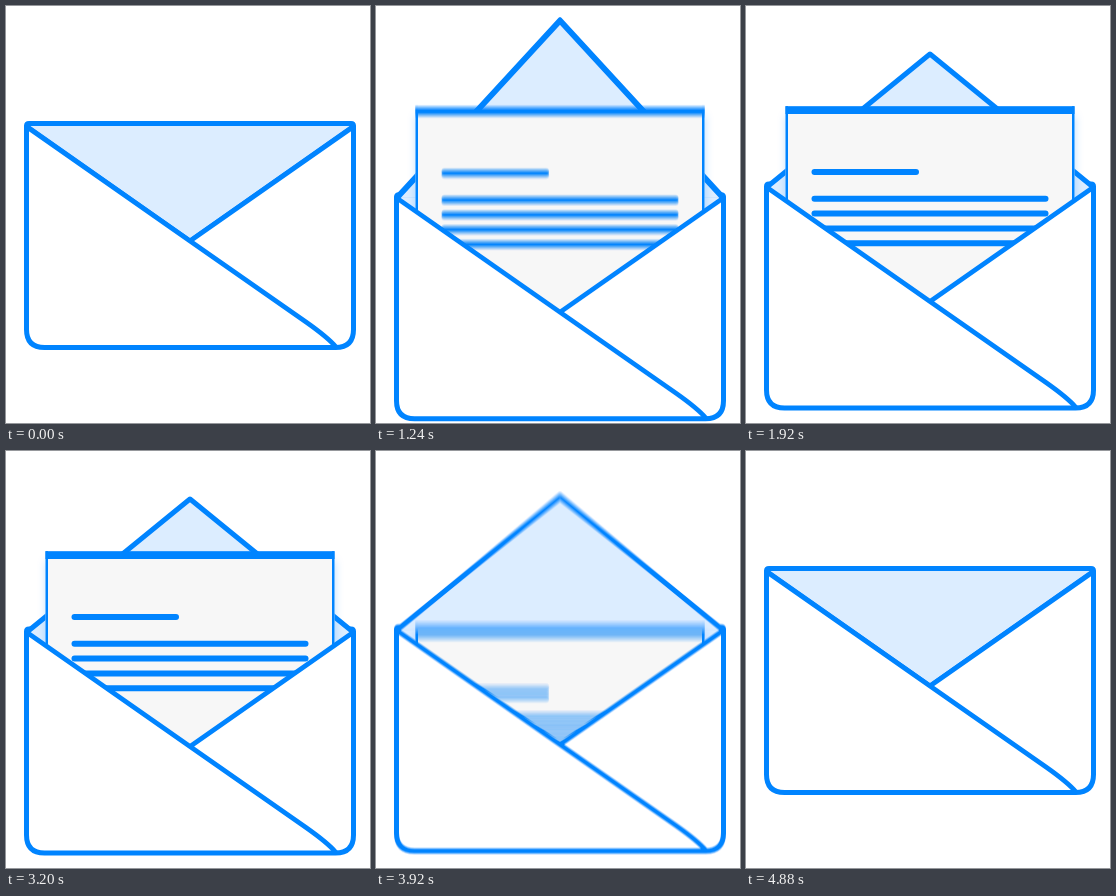
An HTML page with a canvas for the animation above (5.52 s loop, 364 by 417 pixels).

```html
<!DOCTYPE html>
<html lang="en">
<head>
<meta charset="utf-8">
<title>Envelope</title>
<style>
  html, body { margin: 0; width: 100%; height: 100%; overflow: hidden; background: #fff; }
  canvas { display: block; width: 364px; height: 417px; }
</style>
</head>
<body>
<canvas id="stage" width="364" height="417"></canvas>
<script>
const W = 364, H = 417, LOOP = 5520, STEP = 40;
const SHUTTER = 20, SAMPLES = 16;
const BLUE = '#0084ff', PALE = '#dcedff', PAPER = '#f7f7f7';
const OVER = 0.18; // share by which each move swings past both ends

const out = document.getElementById('stage').getContext('2d');
const buffer = document.createElement('canvas');
buffer.width = W;
buffer.height = H;
const g = buffer.getContext('2d');

// Key times: start, wind-up, overshoot, settled.
const envelopeKeys = { open: [40, 440, 1180, 1680], close: [3280, 3680, 4420, 4840] };
const paperKeys = { open: [300, 661, 1500, 1920], close: [3200, 3560, 4290, 4640] };

// cubic-bezier(.6, 0, .4, 1)
function ease(x) {
  if (x <= 0) return 0;
  if (x >= 1) return 1;
  let lo = 0, hi = 1;
  for (let i = 0; i < 24; i++) {
    const u = (lo + hi) / 2;
    const at = u * u * (3 - 2 * u) + 1.8 * u * (1 - u) * (1 - 2 * u);
    if (at < x) lo = u; else hi = u;
  }
  return lo * lo * (3 - 2 * lo);
}

// 0 to 1 with a swing before the start and past the end
function swing(t, keys) {
  const levels = [0, -OVER, 1 + OVER, 1];
  let v = 0;
  for (let i = 0; i < 3; i++) {
    const x = (t - keys[i]) / (keys[i + 1] - keys[i]);
    v += (levels[i + 1] - levels[i]) * ease(x);
  }
  return v;
}

const openness = (t, keys) => swing(t, keys.open) - swing(t, keys.close);

function stroke(path, width) {
  g.lineWidth = width;
  g.stroke(new Path2D(path));
}

function fill(path, color) {
  g.fillStyle = color;
  g.fill(new Path2D(path));
}

function drawBack() {
  fill('M20.5 118H347.5L184 236Z', PALE);
  stroke('M20.5 126V120Q20.5 117.5 23 117.5H345Q347.5 117.5 347.5 120V126', 5);
}

function drawFlap(open) {
  g.save();
  g.translate(0, 120.5);
  g.scale(1, (247.5 * open - 114.5) / 133);
  const edge = 'M21 0L184 -133L347 0';
  fill(edge + 'Z', PALE);
  stroke(edge, 5);
  g.restore();
}

function drawPaper(top, bottom) {
  g.save();
  g.beginPath();
  g.rect(0, 0, W, bottom);
  g.clip();
  g.translate(0, top);
  g.shadowColor = 'rgba(0,132,255,.28)';
  g.shadowBlur = 9;
  g.shadowOffsetY = 9;
  g.fillStyle = PAPER;
  g.fillRect(39.5, -3, 289, 240);
  g.shadowColor = 'transparent';
  g.fillStyle = BLUE;
  g.fillRect(39.5, -3.8, 2.5, 240);
  g.fillRect(326, -3.8, 2.5, 240);
  g.fillRect(39.5, -3.8, 289, 7.8);
  stroke('M68.5 62H170', 6);
  for (let i = 0; i < 4; i++) {
    stroke(`M68.5 ${88.8 + 14.8 * i}H299.5`, 6);
  }
  g.restore();
}

function drawFront() {
  const body = 'M20.5 121V323.5Q20.5 341.5 38.5 341.5H329.5Q347.5 341.5 347.5 323.5V121';
  fill(body + 'L184 235Z', '#fff');
  stroke(body, 5);
  stroke('M21 121L184 235L347 121M184 235L300 316Q322 331.5 330 341', 4.6);
}

function drawScene(t) {
  const dy = 60.5 * openness(t, envelopeKeys);
  g.fillStyle = '#fff';
  g.fillRect(0, 0, W, H);
  g.strokeStyle = BLUE;
  g.lineCap = g.lineJoin = 'round';
  g.save();
  g.translate(0, dy);
  drawBack();
  drawFlap(openness(t - 15, envelopeKeys));
  g.restore();
  drawPaper(264 - 160 * openness(t, paperKeys), 325 + dy);
  g.save();
  g.translate(0, dy);
  drawFront();
  g.restore();
}

// Averages several moments for motion blur.
function render(t) {
  const still = t < 20 || t > 4880 || (t >= 1940 && t < 3180);
  const count = still ? 1 : SAMPLES;
  for (let i = 0; i < count; i++) {
    drawScene(t + SHUTTER * ((i + 0.5) / count - 0.5));
    out.globalAlpha = 1 / (i + 1);
    out.drawImage(buffer, 0, 0);
  }
}

const begin = performance.now();
let shown = -1;

function tick() {
  const t = Math.floor(((performance.now() - begin) % LOOP) / STEP) * STEP;
  if (t !== shown) {
    shown = t;
    render(t);
  }
  requestAnimationFrame(tick);
}
tick();
</script>
</body>
</html>
```
